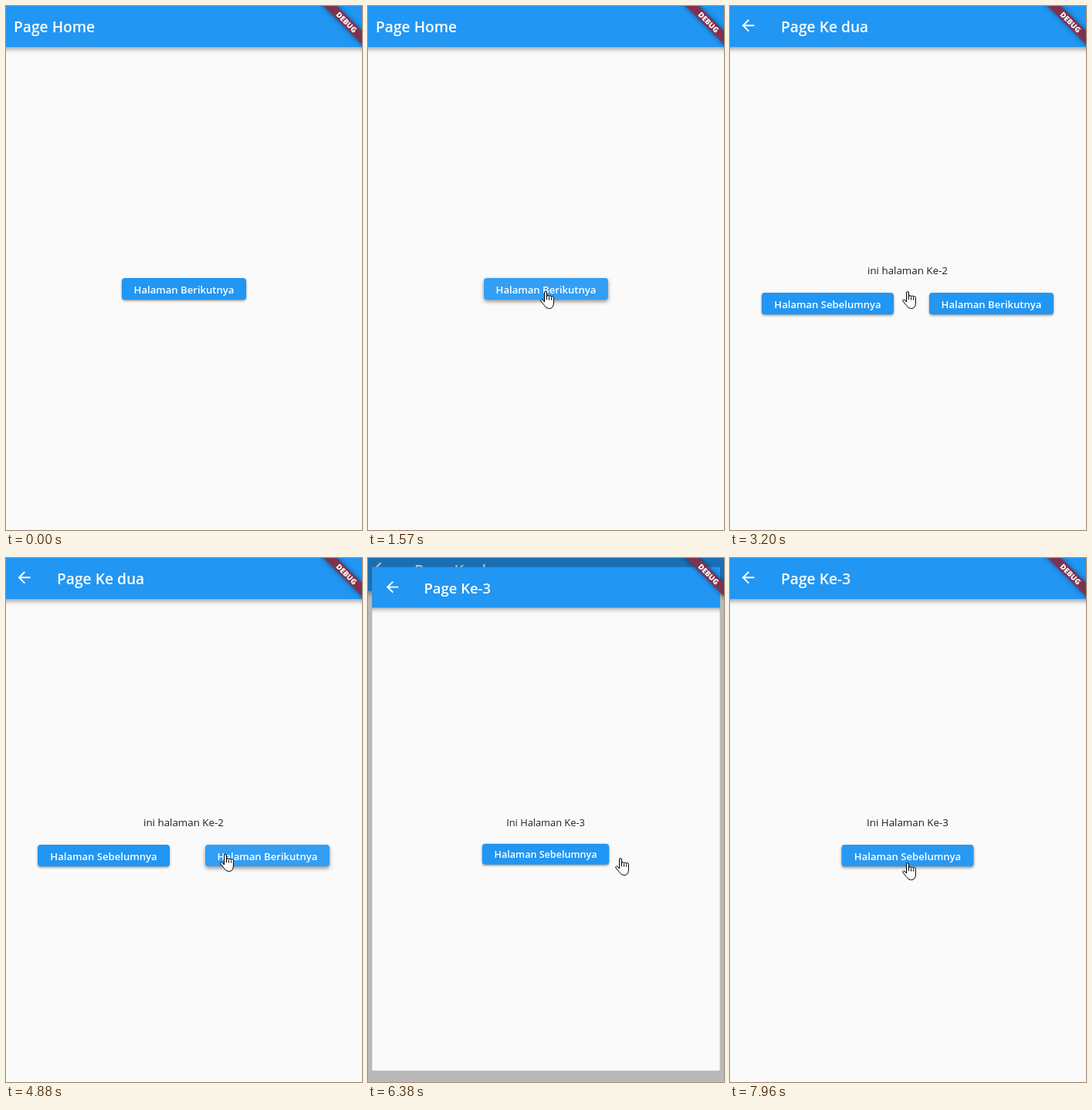
Animation, 461 px wide and 678 px high, one loop 8 s. Source, as an HTML page with a canvas:

```html
<!DOCTYPE html>
<html lang="id">
<head>
<meta charset="utf-8">
<title>Page Home</title>
<style>
html, body { margin: 0; width: 100%; height: 100%; overflow: hidden; background: #fafafa; }
canvas { display: block; }
</style>
</head>
<body>
<canvas id="stage" width="461" height="678"></canvas>
<script>
const ctx = document.getElementById('stage').getContext('2d');
const W = 461, H = 678, LOOP = 8000;
const BLUE = '#2196f3', PAPER = '#fafafa', FONT = '"Open Sans", "Noto Sans", sans-serif';

// Buttons are [x, y, width, label]; the last one of a page is the one pointed at.
const pages = [
  { title: 'Page Home', buttons: [[150, 352, 161, 'Halaman Berikutnya']], hover: 1190, press: 2740 },
  { title: 'Page Ke dua', back: true, text: 'ini halaman Ke-2',
    buttons: [[41, 371, 171, 'Halaman Sebelumnya'], [258, 371, 161, 'Halaman Berikutnya']],
    hover: 4600, press: 6160 },
  { title: 'Page Ke-3', back: true, text: 'Ini Halaman Ke-3',
    buttons: [[144.5, 371, 171, 'Halaman Sebelumnya']], hover: 7880, press: Infinity },
];
const openings = [2896, 6290];

// Screen refreshes: [start, interval]
const ticks = [[0, 70], [460, 70], [1300, 67.5], [2760, 73], [4320, 70], [5150, 70], [6170, 70], [7400, 70]];

// Pointer strokes: start, end, then from, bend and to
const moves = [
  [460, 1230, 367, 647, 268, 470, 232, 379],
  [1300, 1570, 232, 379, 230, 372, 229, 370],
  [4320, 4880, 229, 370, 258, 382, 283, 384],
  [5150, 5570, 283, 384, 305, 388, 326, 389],
  [7400, 7960, 326, 389, 270, 444, 229, 395],
];

const arrowIcon = new Path2D('M20 11H7.83l5.59-5.59L12 4l-8 8 8 8 1.41-1.41L7.83 13H20z');
const pointer = new Path2D('M.5 .5V16.5L4.3 13L6.8 18.6L9.2 17.6L6.8 12H12Z');
const hand = new Path2D('M5.5 14V2a1.5 1.5 0 0 1 3 0V7a1.5 1.5 0 0 1 3 .3a1.5 1.5 0 0 1 3 .5' +
  'a1.4 1.4 0 0 1 2.9 .6V15Q17.4 22.5 11.5 22.5Q7.8 22.5 5.5 18.5L1 13Q.2 11.4 1.6 10.8Q2.8 10.5 4 12Z');
const knuckles = new Path2D('M8.5 7v4M11.5 8v3.5M14.5 8.5v3');

const ramp = (v, a, b) => Math.min(1, Math.max(0, (v - a) / (b - a)));
const mix = (a, b, k) => a + (b - a) * k;
const smooth = k => k * k * (3 - 2 * k);

function bezier(x, x1, y1, x2, y2) {
  const at = (s, a, b) => 3 * s * (1 - s) ** 2 * a + 3 * s * s * (1 - s) * b + s ** 3;
  let lo = 0, hi = 1;
  for (let i = 0; i < 24; i++) {
    const mid = (lo + hi) / 2;
    if (at(mid, x1, x2) < x) lo = mid; else hi = mid;
  }
  return at(lo, y1, y2);
}

function zoomCurve(p) {
  const cut = 1 / 6;
  return p < cut
    ? 0.4 * bezier(p / cut, 0.05, 0, 0.1333, 0.06)
    : mix(0.4, 1, bezier((p - cut) / (1 - cut), 0.2083, 0.82, 0.25, 1));
}

function snap(t) {
  const [start, step] = ticks.findLast(tick => t >= tick[0]);
  return start + Math.floor((t - start) / step + 1e-6) * step;
}

function cursorAt(t) {
  const move = moves.findLast(m => t >= m[0]);
  if (!move) return null;
  const [start, end, x0, y0, x1, y1, x2, y2] = move;
  const lead = start === 460 ? 0 : 70;
  const k = smooth(ramp(t, start - lead, end));
  const curve = (a, b, c) => mix(mix(a, b, k), mix(b, c, k), k);
  return { x: curve(x0, x1, x2), y: curve(y0, y1, y2) };
}

function label(text, x, y, size, weight, color, align = 'center') {
  ctx.font = `${weight} ${size}px ${FONT}`;
  ctx.textAlign = align;
  ctx.fillStyle = color;
  ctx.fillText(text, x, y);
}

function shadow(alpha, blur, y) {
  ctx.shadowColor = `rgba(0,0,0,${alpha})`;
  ctx.shadowBlur = blur;
  ctx.shadowOffsetY = y;
}

function drawButton([x, y, w, text], hover, pressAge, cursor) {
  const pressed = ramp(pressAge, 0, 75);
  const shape = new Path2D();
  shape.roundRect(x, y, w, 28, 4);
  ctx.save();
  shadow(0.42, 3 + 2 * hover + 2 * pressed, 1.5 + hover + pressed);
  ctx.fillStyle = BLUE;
  ctx.fill(shape);
  shadow(0, 0, 0);
  ctx.fillStyle = `rgba(255,255,255,${0.08 * hover + 0.04 * pressed})`;
  ctx.fill(shape);
  if (pressed > 0) {
    ctx.clip(shape);
    ctx.fillStyle = `rgba(255,255,255,${0.06 * pressed})`;
    ctx.beginPath();
    ctx.arc(cursor.x, cursor.y, 24 + 0.0009 * pressAge ** 2, 0, 7);
    ctx.fill();
  }
  ctx.restore();
  label(text, x + w / 2, y + 19.5, 13.1, 600, '#fff');
}

function drawPage(page, t, cursor, scale = 1, alpha = 1) {
  ctx.save();
  ctx.globalAlpha = alpha;
  ctx.translate(230.5, 337.5);
  ctx.scale(scale, scale);
  ctx.translate(-230.5, -337.5);
  ctx.beginPath();
  ctx.rect(-4, -1.5, 469, 678.5);
  ctx.clip();
  ctx.fillStyle = PAPER;
  ctx.fill();

  ctx.save();
  shadow(0.45, 7, 2);
  ctx.fillStyle = BLUE;
  ctx.fillRect(-10, -10, 481, 63);
  ctx.restore();
  if (page.back) {
    ctx.save();
    ctx.translate(11.5, 13.3);
    ctx.fillStyle = '#fff';
    ctx.fill(arrowIcon);
    ctx.restore();
  }
  label(page.title, page.back ? 66 : 10, 34, 19.2, 600, '#fff', 'left');
  if (page.text) label(page.text, 230, 347, 13.35, 400, '#212121');

  page.buttons.forEach((button, i) => {
    const active = i === page.buttons.length - 1;
    drawButton(button, active ? ramp(t, page.hover, page.hover + 200) : 0,
      active ? t - page.press : -1, cursor);
  });
  ctx.restore();
}

function drawBanner() {
  ctx.save();
  ctx.translate(441, 21);
  ctx.rotate(Math.PI / 4);
  shadow(0.5, 6, 0);
  ctx.fillStyle = '#7d3350';
  ctx.fillRect(-45, -6, 90, 12);
  shadow(0, 0, 0);
  label('DEBUG', 0, 3.6, 9.6, 800, '#fff');
  ctx.restore();
}

function drawCursor({ x, y }, pointing) {
  const shape = pointing ? hand : pointer;
  ctx.save();
  ctx.translate(pointing ? x - 6 : x, pointing ? y - 1 : y);
  ctx.fillStyle = '#fff';
  ctx.strokeStyle = '#000';
  ctx.lineWidth = 1;
  ctx.fill(shape);
  ctx.stroke(shape);
  if (pointing) ctx.stroke(knuckles);
  ctx.restore();
}

function draw(now) {
  const t = snap(now % LOOP);
  const cursor = cursorAt(t);
  const top = openings.filter(start => t >= start).length;
  const progress = top ? ramp(t, openings[top - 1], openings[top - 1] + 300) : 1;

  ctx.fillStyle = PAPER;
  ctx.fillRect(0, 0, W, H);
  if (progress < 0.995) {
    const zoom = zoomCurve(progress);
    drawPage(pages[top - 1], t, cursor, 1 + 0.05 * zoom);
    ctx.fillStyle = `rgba(0,0,0,${0.6 * ramp(progress, 0.2075, 0.4175)})`;
    ctx.fillRect(0, 0, W, H);
    drawPage(pages[top], t, cursor, 0.85 + 0.15 * zoom, ramp(progress, 0.125, 0.25));
  } else {
    drawPage(pages[top], t, cursor);
  }
  drawBanner();

  const gliding = t < 1190 || (t >= 4320 && t < 4600) || (t >= 7400 && t < 7880);
  if (cursor) drawCursor(cursor, !gliding);
}

const begin = performance.now();
(function loop() {
  draw(performance.now() - begin);
  requestAnimationFrame(loop);
})();
</script>
</body>
</html>
```
